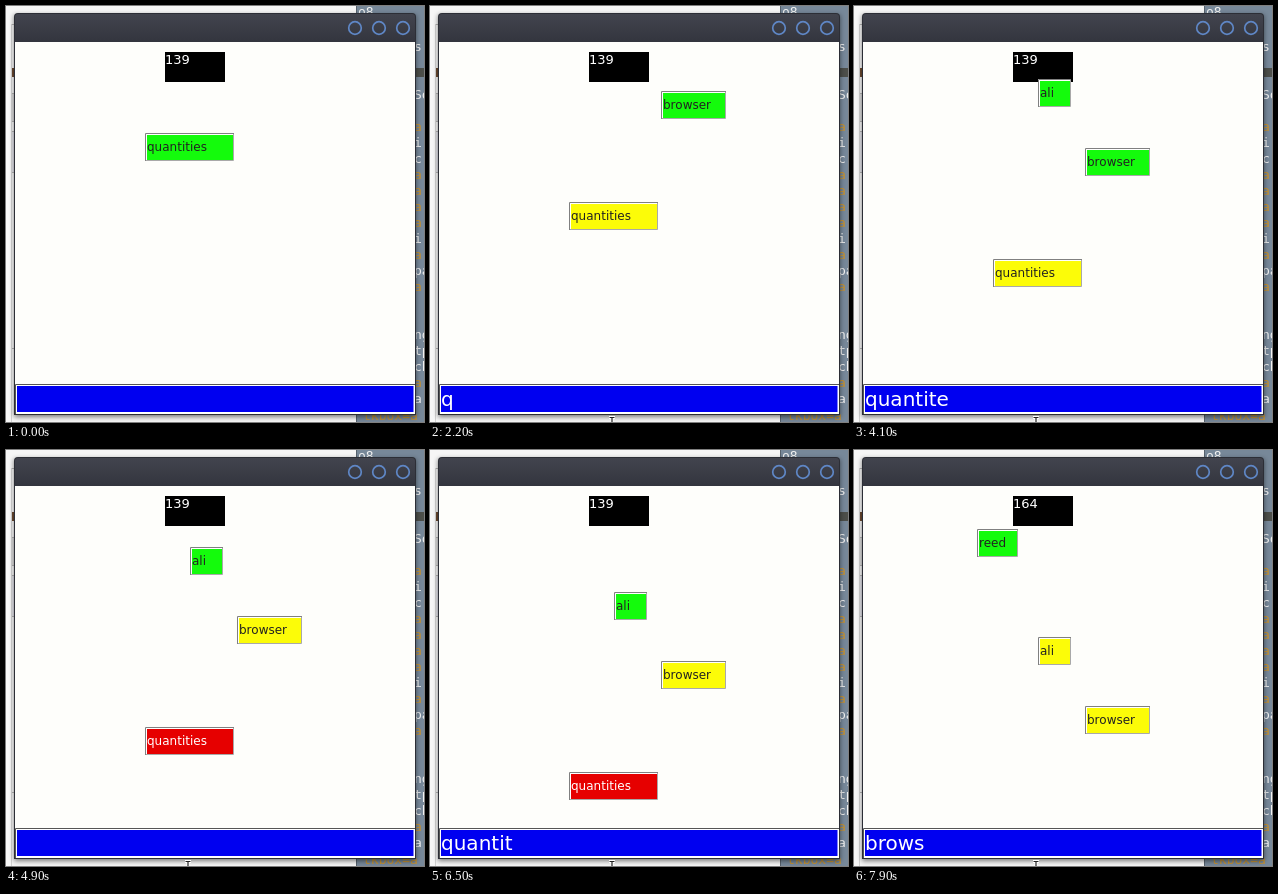
Write an HTML page that moves like this. It is 418 px wide and 416 px high and loops after 8000 ms.

```html
<!DOCTYPE html>
<html lang="en">
<head>
<meta charset="utf-8">
<title>Falling words</title>
<style>
html, body { margin: 0; width: 100%; height: 100%; overflow: hidden; background: #f4f4f4; }
svg { display: block; width: 418px; height: 416px; }
text { font-family: "DejaVu Sans", sans-serif; white-space: pre; }
.code text { font: 13px "DejaVu Sans Mono", monospace; }
</style>
</head>
<body>
<svg id="stage" viewBox="0 0 418 416">
  <defs>
    <linearGradient id="bar" x1="0" y1="0" x2="0" y2="1">
      <stop offset="0" stop-color="#42444e"/>
      <stop offset="1" stop-color="#33353e"/>
    </linearGradient>
    <filter id="soft" x="-5%" y="-5%" width="110%" height="110%">
      <feGaussianBlur stdDeviation="2.5"/>
    </filter>
  </defs>
  <g id="desk">
    <rect width="418" height="416" fill="#f6f6f6"/>
    <path d="M5.5 18V416" stroke="#d2d2d2"/>
    <path d="M6 18.5H10M6 87.5H10M6 115.5H10M6 125.5H10M6 166.5H10M6 342.5H10" stroke="#b4b4b4"/>
    <rect x="6" y="88" width="3" height="27" fill="#dcdcdc"/>
    <rect x="6" y="126" width="3" height="40" fill="#e2e2e8"/>
    <rect x="6" y="62" width="3" height="9" fill="#6b4a30"/>
    <rect x="350" width="68" height="416" fill="#778899"/>
    <path d="M350.5 0V416" stroke="#56616c"/>
    <rect x="409" y="62" width="9" height="9" fill="#4d4f4a"/>
    <g id="code" class="code"></g>
  </g>
  <rect x="8" y="9" width="402" height="402" fill="#000" opacity=".5" filter="url(#soft)"/>
  <path d="M8 409V11Q8 7 12 7H406Q410 7 410 11V409Z" fill="#2c2e36"/>
  <path d="M9 36V11Q9 8 12 8H406Q409 8 409 11V36Z" fill="url(#bar)"/>
  <g fill="none" stroke="#5f87c6" stroke-width="1.7">
    <circle cx="349" cy="22" r="6.3"/><circle cx="373" cy="22" r="6.3"/><circle cx="397" cy="22" r="6.3"/>
  </g>
  <rect x="9" y="36" width="400" height="372" fill="#fefefb"/>
  <rect x="159" y="46" width="60" height="30"/>
  <text id="score" x="159" y="58" font-size="13" fill="#fff"></text>
  <g id="words"></g>
  <rect x="9" y="378" width="400" height="30" fill="#fff"/>
  <path d="M9.5 408V378.5H409" fill="none" stroke="#555"/>
  <rect x="11" y="380" width="396.500" height="26" fill="#0000f0"/>
  <text id="entry" x="11" y="400" font-size="20" fill="#fff"></text>
  <g id="cursor" fill="none">
    <path d="M-3 .5H3M0 0V16" stroke="#fff" stroke-width="3"/>
    <path d="M-2.500 .5H2.500M0 0V16" stroke="#222" stroke-width="1.2"/>
  </g>
</svg>
<script>
const LOOP = 8000, TICK = 100, STEP = 3;
const $ = id => document.getElementById(id);

function add(parent, tag, attrs, text) {
  const el = document.createElementNS("http://www.w3.org/2000/svg", tag);
  for (const k in attrs) el.setAttribute(k, attrs[k]);
  if (text) el.textContent = text;
  parent.appendChild(el);
  return el;
}

// slivers of the editor behind the window
const white = "#f2f2f2", orange = "#c8922e";
const lines = [
  [45, "s"], [93, "So"], [125, "a", 1], [141, "i"], [157, "c"], [173, "a", 1],
  [189, "a", 1], [205, "a", 1], [221, "a", 1], [237, "i:"], [253, "a", 1],
  [269, "pa"], [285, "a", 1], [301, " ("], [317, " '"], [333, "ng"],
  [349, "tp"], [365, "ch"], [381, "a", 1], [397, "a"]
];
for (const [y, s, o] of lines) add($("code"), "text", { x: 408, y, fill: o ? orange : white }, s);
add($("code"), "text", { x: 352, y: 10, fill: white }, "o8");
add($("code"), "text", { x: 357, y: 414, fill: orange }, "tkbox=a");

// y is the height at step 0; each word lives from one tick to another
const words = [
  { text: "quantities", x: 139, w: 89, y: 127, from: 0, to: 71 },
  { text: "browser", x: 231, w: 65, y: 16, from: 10, to: 80 },
  { text: "ali", x: 184, w: 33, y: -53, from: 34, to: 80 },
  { text: "reed", x: 123, w: 41, y: -161, from: 70, to: 80 }
];
for (const o of words) {
  o.g = add($("words"), "g", {});
  add(o.g, "rect", { width: o.w, height: 28, fill: "#fff" });
  add(o.g, "path", { d: `M.5 28V.5H${o.w}`, fill: "none", stroke: "#808080" });
  add(o.g, "path", { d: `M1 27.5H${o.w - .5}V1`, fill: "none", stroke: "#a9a9a9" });
  o.box = add(o.g, "rect", { x: 2, y: 2, width: o.w - 3, height: 25 });
  o.label = add(o.g, "text", { x: 2, y: 18, "font-size": 12 }, o.text);
}

// typing runs: text, first key, time per key, cleared at
const runs = [
  ["quantites", 1900, 310, 4700],
  ["quantities", 5100, 220, 7150],
  ["brows", 7300, 130, LOOP]
];

function typed(t) {
  for (const [s, start, gap, end] of runs)
    if (t >= start && t < end) return s.slice(0, 1 + Math.floor((t - start) / gap));
  return "";
}

// the picture stalls for a tick twice, then catches up
function steps(n) {
  if (n === 33 || n === 47) n--;
  return n + (n >= 5) - (n >= 57 && n < 72);
}

const path = [[0, 226, 430], [500, 222, 420], [1000, 212, 402], [1500, 182, 411], [LOOP, 182, 411]];
function pointer(t) {
  let i = 1;
  while (t > path[i][0]) i++;
  const a = path[i - 1], b = path[i], k = (t - a[0]) / (b[0] - a[0]);
  return [a[1] + (b[1] - a[1]) * k, a[2] + (b[2] - a[2]) * k].map(Math.round);
}

function draw(time) {
  const n = Math.floor(time % LOOP / TICK), t = n * TICK, s = steps(n);
  for (const o of words) {
    const y = o.y + STEP * s, on = n >= o.from && n < o.to;
    o.g.setAttribute("display", on ? "inline" : "none");
    o.g.setAttribute("transform", `translate(${o.x} ${y})`);
    o.box.setAttribute("fill", y < 150 ? "#14fb0c" : y < 264 ? "#fcfc08" : "#e60000");
    o.label.setAttribute("fill", y < 264 ? "#222" : "#fff");
  }
  $("score").textContent = n < 71 ? "139" : "164";
  $("entry").textContent = typed(t);
  $("cursor").setAttribute("transform", `translate(${pointer(t).join(" ")})`);
}

const t0 = performance.now();
function loop() {
  draw(performance.now() - t0);
  requestAnimationFrame(loop);
}
loop();
</script>
</body>
</html>
```
